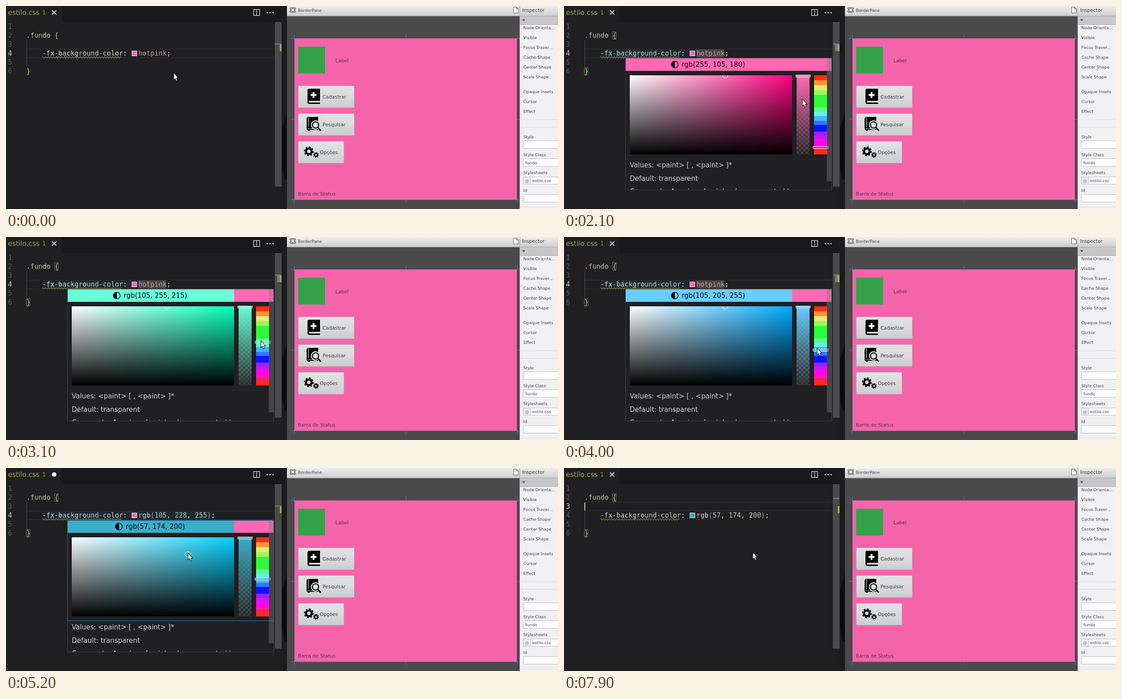
An HTML page that plays this animation: 1234 px wide and 454 px high, repeating every 8000 ms.

```html
<!DOCTYPE html>
<html lang="pt">
<head>
<meta charset="utf-8">
<title>estilo.css</title>
<style>
html, body { margin: 0; width: 100%; height: 100%; overflow: hidden; background: #1e1d1f; }
svg { display: block; }
text { white-space: pre; }
.mono { font: 15px "DejaVu Sans Mono", monospace; fill: #c9c9c9; }
.ui { font: 15px "DejaVu Sans", sans-serif; fill: #cfcfcf; }
.app { font: 10.8px "DejaVu Sans", sans-serif; fill: #3d3d3d; }
.small { font: 9.25px "DejaVu Sans", sans-serif; fill: #454345; }
.num { fill: #5c5c5e; }
.num.on { fill: #cccccc; }
.sel { fill: #cdb98a; }
.brace { fill: #a9cf84; }
.val { fill: #c69a8e; }
.fn { fill: #cfcdb0; }
.paren { fill: #b884b8; }
.lit { fill: #b5c8a6; }
.box { fill: none; stroke: #62866a; }
.knob { fill: none; stroke: #e4e4e4; stroke-width: 1.3; }
.field { fill: #fdfdfd; stroke: #bdbbbd; }
</style>
</head>
<body>
<svg width="1234" height="454" viewBox="0 0 1234 454">
<defs>
  <linearGradient id="white"><stop stop-color="#fff"/><stop offset="1" stop-color="#fff" stop-opacity="0"/></linearGradient>
  <linearGradient id="black" x2="0" y2="1"><stop stop-opacity="0"/><stop offset="1"/></linearGradient>
  <linearGradient id="fade" x2="0" y2="1"><stop class="tint"/><stop class="tint" offset="1" stop-opacity="0"/></linearGradient>
  <linearGradient id="hues" x2="0" y2="1"></linearGradient>
  <linearGradient id="bar" x2="0" y2="1"><stop stop-color="#eeeeee"/><stop offset="1" stop-color="#cfcfcf"/></linearGradient>
  <linearGradient id="btn" x2="0" y2="1"><stop stop-color="#e2e2e3"/><stop offset=".5" stop-color="#d9dadb"/><stop offset="1" stop-color="#cbcccd"/></linearGradient>
  <pattern id="check" x="520" y="155" width="10" height="10" patternUnits="userSpaceOnUse">
    <path fill="#262626" d="M0 0h10v10H0z"/><path fill="#3b3b3b" d="M0 0h5v5H0zM5 5h5v5H5z"/>
  </pattern>
  <clipPath id="panelClip"><path d="M147 155h363v177H147z"/></clipPath>
  <clipPath id="popClip"><path d="M138 117h461v294H138z"/></clipPath>
</defs>

<!-- editor -->
<path fill="#1f1e20" d="M0 0h628v454H0z"/>
<path fill="#19181a" d="M125 0h491v36H125z"/>
<path fill="#1b1a1c" d="M616 0h12v454h-12z"/>
<path fill="#0b0a0c" d="M628 236L623 256 617 273V358L623 387 628 389z"/>
<text class="ui" x="4.5" y="19.5" style="font-size:15.4px;fill:#95a650">estilo.css</text>
<text class="ui" x="80.5" y="19" style="font-size:14.5px;fill:#7d943f">1</text>
<path id="close" stroke="#f0f0f0" stroke-width="1.6" d="M102.5 9.500l10 10M112.500 9.500l-10 10"/>
<circle id="dirty" cx="107.500" cy="14.500" r="5" fill="#fff"/>
<path fill="none" stroke="#d2d2d2" stroke-width="1.4" d="M553.500 8h13.500v13h-13.500zM560.300 8v13"/>
<g fill="#d2d2d2"><circle cx="584" cy="15" r="1.500"/><circle cx="590.500" cy="15" r="1.500"/><circle cx="597" cy="15" r="1.500"/></g>

<path fill="#4a494b" d="M601 36h15v368h-15z"/>
<path id="rulerWord" fill="#7c7b7d" d="M606 84h10v17h-10z"/>
<path fill="#a6a45c" d="M612 85h4v16h-4z"/>
<path id="rulerLine" fill="#7c7b7d" d="M601 84h15v2h-15z"/>

<path id="current" fill="none" stroke="#2e2d2f" d="M46 .5h555M46 19.500h555"/>
<path stroke="#4b4a4c" d="M46.500 76v60"/>
<path id="range" fill="#1d2a31"/>
<path id="word" fill="#4b4547" d="M296 97h62v18h-62z"/>
<g id="numbers"></g>
<g id="braces" class="box"><path d="M108.500 57.500h8v17h-8z"/><path d="M45.500 137.500h8v17h-8z"/></g>
<text class="mono" y="70.500"><tspan class="sel" x="45.500">.fundo</tspan><tspan class="brace" x="108.500">{</tspan></text>
<text class="mono" x="81" y="110.500">-fx-background-color:</text>
<path id="squiggle" fill="none" stroke="#84a24d" stroke-width="1.200"/>
<rect id="swatch" x="281.500" y="100.500" width="11" height="11" stroke="#eee"/>
<text class="mono" id="value" x="296" y="110.500"></text>
<text class="mono brace" x="45.500" y="150.500">}</text>
<path id="caret" fill="#d0d0d0" d="M45.500 77h2v18h-2z"/>

<!-- color picker -->
<g id="popup">
  <path fill="#201f21" stroke="#454446" d="M137.500 116.500h461v295h-461z"/>
  <path id="header" d="M138 117h372v28H138z"/>
  <path fill="#ff69b4" d="M510 117h88v28h-88z"/>
  <g id="contrast"><circle r="7.500" fill="none" stroke="#000" stroke-width="1.400"/><path d="M0-8a8 8 0 0 0 0 16z"/></g>
  <text class="ui" id="label" x="334" y="136" text-anchor="middle" style="fill:#0a0a0a"></text>
  <path id="pure" d="M147 155h363v177H147z"/>
  <path fill="url(#white)" d="M147 155h363v177H147z"/>
  <path fill="url(#black)" d="M147 155h363v177H147z"/>
  <g clip-path="url(#panelClip)"><circle id="pick" r="6" fill="none" stroke="#e8e8e8" stroke-width="1.200"/></g>
  <path fill="url(#check)" d="M520 155h29v177h-29z"/>
  <path fill="url(#fade)" d="M520 155h29v177h-29z"/>
  <path fill="url(#hues)" d="M559 155h29v177h-29z"/>
  <path class="knob" d="M518.500 154.500h32v4h-32z"/>
  <path class="knob" id="hueKnob" d="M557-2.200h33.500v4.400H557z"/>
  <path stroke="#2d2c2e" d="M138 342.500h460"/>
  <g class="ui" clip-path="url(#popClip)">
    <text x="147" y="361">Values: &lt;paint&gt; [ , &lt;paint&gt; ]*</text>
    <text x="147" y="391">Default: transparent</text>
    <text x="147" y="419.500">Comments: A series of paint values separated by</text>
  </g>
  <path id="focus" fill="none" stroke="#1a6fa8" d="M137.500 117.500h461v224h-461z"/>
  <path id="scroll" fill="#797979" d="M587.500 117h11v275h-11z"/>
</g>

<!-- scene builder -->
<path fill="#4b4a4b" d="M628 0h520v454H628z"/>
<path fill="url(#bar)" d="M628 0h520v22H628z"/>
<path fill="#a5a5a5" d="M628 21.500h520v1.500H628z"/>
<path fill="none" stroke="#4c4c4c" d="M635.500 3.500h11v11h-11zM637.500 5.500h7v7h-7zM633.500 5.500h2M633.500 12.500h2M646.500 5.500h2M646.500 12.500h2"/>
<path fill="#f6f6f6" stroke="#555" d="M1134.500 2.500h7l4 4v9h-11zM1141.500 2.500v4h4"/>
<text class="small" x="652.500" y="13">BorderPane</text>
<path fill="#f564ab" d="M645 72.500h497v361H645z"/>
<path fill="none" stroke="#2b86b8" d="M637 72.500h8M644.500 64v12M894.500 64v9M1142 72.500h6M1142.500 64v12M637 253.500h8M1142 253.500h6M637 433.500h8M644.500 430v10M894.500 433v7M1142 433.500h6M1142.500 430v10"/>
<path fill="#35a24a" d="M653 91h60v60h-60z"/>
<text class="app" x="736.500" y="125.500" style="fill:#58324a">Label</text>
<g fill="url(#btn)" stroke="#b9a7b1">
  <rect x="653.500" y="178.500" width="125" height="49" rx="1.500"/>
  <rect x="653.500" y="240.500" width="125" height="49" rx="1.500"/>
  <rect x="653.500" y="302.500" width="102" height="49" rx="1.500"/>
</g>
<text class="app" x="707.500" y="206.500">Cadastrar</text>
<text class="app" x="707.500" y="269">Pesquisar</text>
<text class="app" x="701.500" y="331">Opções</text>
<text class="app" x="652.500" y="423.500" style="fill:#58324a">Barra de Status</text>
<path d="M678 185h24v27h-24q-2 3 0 4h24v3h-24q-4 0-4-5v-25q0-4 4-4z"/>
<path stroke="#fff" stroke-width="4" d="M681 199h13M687.500 192.500v13"/>
<path d="M677 248h21v29h-19v2q-7 0-7-6v-20q0-5 5-5z"/>
<path stroke="#d9dadb" stroke-width="1.200" d="M676.500 249v22M674 274.500h12"/>
<circle cx="692" cy="266" r="7.500" fill="#dcdddd" stroke="#d9dadb" stroke-width="6"/>
<circle cx="692" cy="266" r="7" fill="none" stroke="#000" stroke-width="2.200"/>
<path stroke="#000" stroke-width="3.200" stroke-linecap="round" d="M697.500 272l5.500 6"/>
<g fill="none" stroke="#000">
  <circle cx="677" cy="325" r="6.300" stroke-width="4.600"/>
  <circle cx="677" cy="325" r="9.300" stroke-width="3.400" stroke-dasharray="3.652"/>
  <circle cx="693" cy="333" r="3.400" stroke-width="2.600"/>
  <circle cx="693" cy="333" r="5.200" stroke-width="2" stroke-dasharray="2.042"/>
</g>

<!-- inspector -->
<path fill="#f1f0f2" d="M1148 0h86v454h-86z"/>
<path fill="url(#bar)" d="M1148 0h86v22h-86z"/>
<path fill="#cbc6ca" d="M1148 23h86v18h-86z"/>
<path fill="none" stroke="#a9a7a9" d="M1148.500 0v454M1148 22.500h86M1148 41.500h86"/>
<path fill="#555" d="M1154 29.500h7l-3.500 5z"/>
<text class="app" x="1154" y="13" style="font-size:10.700px">Inspector</text>
<path fill="none" stroke="#dddbdd" d="M1149 254.500h85M1149 271.500h85M1149 449.500h85"/>
<g id="props" class="small"></g>
<path class="field" d="M1156.500 301.500h80v17h-80zM1156.500 341.500h80v17h-80zM1156.500 382.500h80v16h-80zM1156.500 421.500h80v17h-80z"/>
<path fill="#ececec" stroke="#bdbbbd" d="M1156.500 382.500h16v16h-16z"/>
<text class="small" x="1161" y="354">fundo</text>
<text class="small" x="1160" y="394" style="fill:#777">@</text>
<text class="small" x="1176" y="394">estilo.css</text>

<path id="mouse" fill="#fff" stroke="#18181a" stroke-width="1.100" stroke-linejoin="round" d="M0 0V15.500L3.300 12.600 5.700 18.200 8.300 17.100 6 11.700H10.300z"/>
</svg>
<script>
const $ = id => document.getElementById(id);
const LOOP = 8000;
const SAT = 150 / 255, SAT_END = 143 / 200, VAL_END = 200 / 255;

// keys: [ms, value, value...]
const mousePath = [[200, 375, 149.5], [1100, 281, 104], [1500, 281, 104], [2100, 533, 208],
  [2300, 560, 220], [2500, 569, 226], [2800, 570, 229], [3100, 570, 232], [3500, 567, 241],
  [3700, 567, 241], [4000, 566, 248], [4100, 566, 248], [4200, 566, 248], [4400, 566, 243],
  [4500, 566, 243], [4900, 372, 165], [5200, 407, 190], [5400, 407, 190], [6000, 469.5, 77.5],
  [7000, 469.5, 77.5], [7400, 422, 188.5]];
const huePath = [[2500, 330], [2600, 150], [2900, 160], [3000, 160], [3100, 164], [3500, 184],
  [3700, 184], [4000, 200], [4200, 200], [4400, 190.8]];
const shadePath = [[4800, SAT, 1], [4900, .62, .94], [5200, SAT_END, VAL_END]];

function at(keys, t) {
  const i = keys.findIndex(k => k[0] > t);
  if (i < 0) return keys[keys.length - 1].slice(1);
  if (i === 0) return keys[0].slice(1);
  const a = keys[i - 1], b = keys[i];
  const u = (t - a[0]) / (b[0] - a[0]);
  return a.slice(1).map((v, n) => v + (b[n + 1] - v) * u);
}

function hsv(h, s, v) {
  const part = n => {
    const k = (n + h / 60) % 6;
    return Math.round(255 * v * (1 - s * Math.max(0, Math.min(k, 4 - k, 1))));
  };
  return `rgb(${part(5)}, ${part(3)}, ${part(1)})`;
}

function valueMarkup(color) {
  if (color === 'hotpink') return '<tspan class="val">hotpink</tspan>;';
  const args = color.match(/\d+/g).map(n => `<tspan class="lit">${n}</tspan>`).join(', ');
  return `<tspan class="fn">rgb</tspan><tspan class="paren">(</tspan>${args}<tspan class="paren">)</tspan>;`;
}

const show = (id, on) => $(id).setAttribute('visibility', on ? 'inherit' : 'hidden');
const move = (id, x, y) => $(id).setAttribute('transform', `translate(${x} ${y})`);
const fill = (id, color) => $(id).setAttribute('fill', color);

$('numbers').innerHTML = [1, 2, 3, 4, 5, 6].map(n =>
  `<text class="mono num" x="4.500" y="${30.5 + 20 * n}">${n}</text>`).join('');

$('props').innerHTML = Object.entries({
  'Node Orienta...': 52, 'Visible': 74, 'Focus Traver...': 96, 'Cache Shape': 118,
  'Center Shape': 140, 'Scale Shape': 162, 'Opaque Insets': 195, 'Cursor': 217, 'Effect': 239,
  'Style': 296, 'Style Class': 336, 'Stylesheets': 376, 'Id': 416
}).map(([name, y]) => `<text x="1156.500" y="${y}">${name}</text>`).join('');

$('squiggle').setAttribute('d', 'M81 115q1.500-3 3 0' + 't3 0'.repeat(58));

// hue bands: color and lower edge
$('hues').innerHTML = (() => {
  const bands = [['#ff2d12', 166], ['#fb9633', 177], ['#e5ea78', 188], ['#98fb55', 199],
    ['#2ffb3c', 227], ['#58f99a', 237], ['#62f3e4', 246], ['#45b4f6', 257], ['#2a78f8', 266],
    ['#0d12ff', 281], ['#a51cff', 290], ['#c61af2', 297], ['#ff06e8', 312], ['#fb1f8c', 316],
    ['#fb1c62', 323], ['#ff2d12', 332]];
  let top = 155;
  return bands.map(([color, end]) => {
    const stop = y => `<stop offset="${(y - 155) / 177}" stop-color="${color}"/>`;
    const pair = stop(top) + stop(end);
    top = end;
    return pair;
  }).join('');
})();

let lastColor = '', lastValue = '';

function setColor(color) {
  if (color === lastColor) return;
  lastColor = color;
  fill('header', color);
  document.querySelectorAll('.tint').forEach(s => s.setAttribute('stop-color', color));
  $('label').textContent = color;
  move('contrast', 334 - $('label').getComputedTextLength() / 2 - 15.5, 131);
}

function setValue(value) {
  if (value === lastValue) return;
  lastValue = value;
  $('value').innerHTML = valueMarkup(value);
}

function draw(t) {
  const [hue] = at(huePath, t), [sat, val] = at(shadePath, t);
  const lineThree = t >= 5900, open = t >= 1500 && t < 6900;
  const line = lineThree ? 3 : 4;

  setValue(t < 4500 ? 'hotpink' : t < 5300 ? hsv(190.8, SAT, 1) : hsv(190.8, SAT_END, VAL_END));
  fill('swatch', t < 5300 ? '#ff69b4' : '#39aec8');
  const end = t < 4500 ? 296 : t < 5300 ? 467 : 458;
  $('range').setAttribute('d', `M81 97H${end}v18H81z`);
  show('range', open);
  show('word', open && t < 4500);
  show('rulerWord', open && t < 4500);
  move('rulerLine', 0, lineThree ? -17 : 0);
  move('current', 0, 16 + 20 * (line - 1) + 20);
  [...$('numbers').children].forEach((n, i) => n.classList.toggle('on', i + 1 === line));
  show('braces', t >= 1200);
  show('caret', lineThree && Math.floor((t - 5900) / 500) % 2 === 0);

  const dirty = t >= 4500 && t < 6800;
  show('dirty', dirty);
  show('close', !dirty);

  show('popup', open);
  setColor(hsv(hue, sat, val));
  fill('pure', hsv(hue, 1, 1));
  move('pick', 147 + 363 * sat, 155 + 177 * (1 - val));
  move('hueKnob', 0, 155 + 176 * hue / 360);
  show('focus', t >= 4300 && t < 5900);
  $('scroll').setAttribute('opacity', t < 6100 ? .42 : t < 6200 ? .2 : 0);

  move('mouse', ...at(mousePath, t));
}

function tick(now) {
  draw(Math.floor(now % LOOP / 100) * 100);
  requestAnimationFrame(tick);
}
draw(0);
requestAnimationFrame(tick);
</script>
</body>
</html>
```
